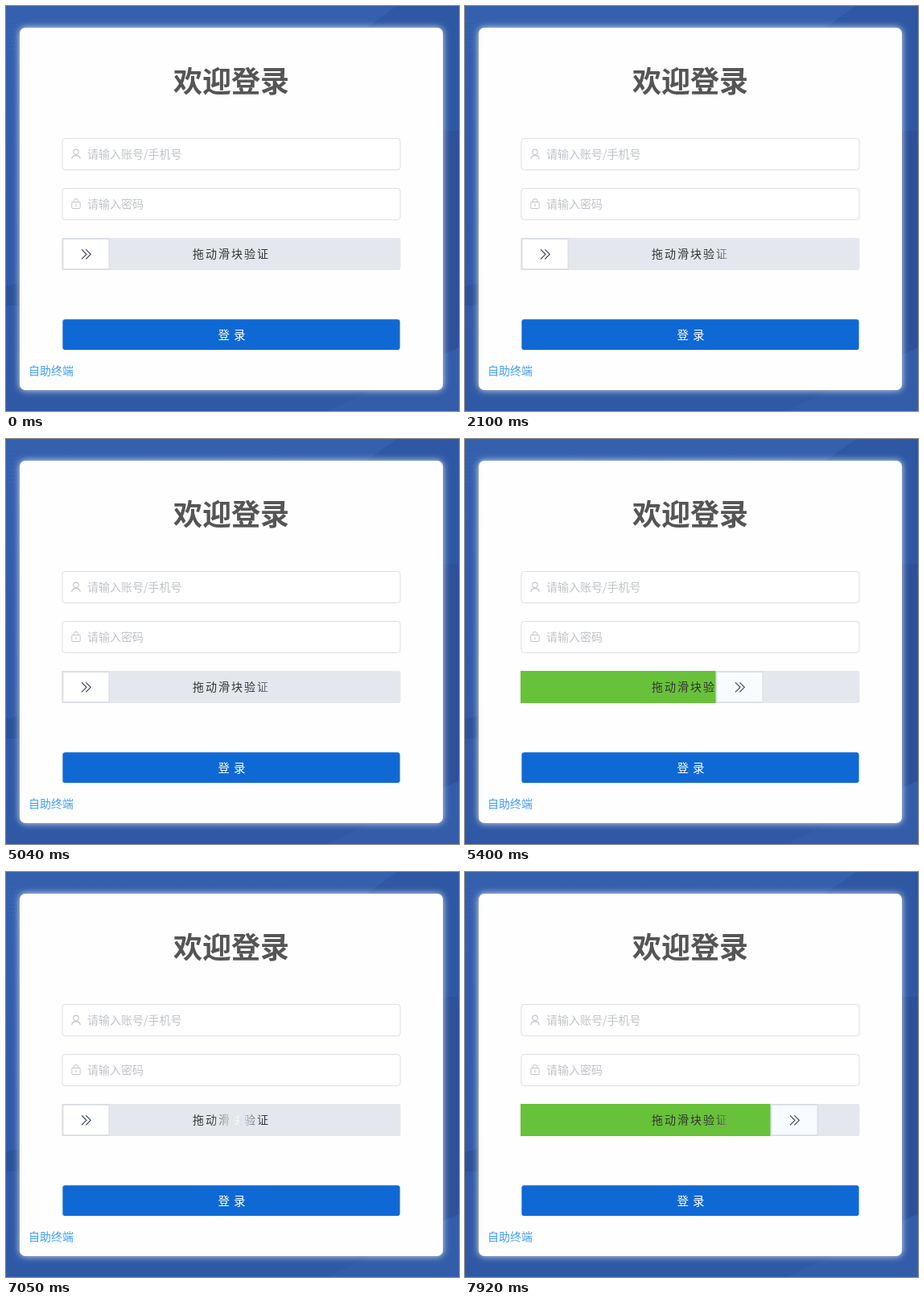
An HTML page with a canvas that plays this animation: 563x503 px, repeating every 8000 ms.

```html
<!DOCTYPE html>
<html lang="zh-CN">
<head>
<meta charset="utf-8">
<style>
html, body { margin: 0; width: 100%; height: 100%; overflow: hidden; background: #315aa7; }
canvas { display: block; width: 563px; height: 503px; }
</style>
</head>
<body>
<canvas id="stage" width="563" height="503"></canvas>
<script>
const ctx = document.getElementById('stage').getContext('2d');
const FONT = '"Noto Sans CJK SC", "Noto Sans CJK", "Noto Sans CJK JP", sans-serif';
const LOOP = 8000, STEP = 30, SHINE = 2880;

// [ms, slider offset in px]
const drags = [
  [[5130, 0], [5220, 45], [5310, 150], [5400, 242], [5520, 285], [5640, 299],
   [5700, 299], [5940, 312], [6089, 312]],
  [[7440, 0], [7530, 45], [7620, 162], [7680, 236], [7770, 280], [7920, 310], [8000, 310]]
];

function offsetAt(t) {
  for (const keys of drags) {
    for (let i = 1; i < keys.length; i++) {
      const [t0, a] = keys[i - 1], [t1, b] = keys[i];
      if (t >= t0 && t <= t1) return Math.round(a + (b - a) * (t - t0) / (t1 - t0));
    }
  }
  return 0;
}

// cubic-bezier(0, 0, .58, 1)
function easeOut(x) {
  let lo = 0, hi = 1;
  for (let i = 0; i < 20; i++) {
    const s = (lo + hi) / 2;
    if (3 * (1 - s) * s * s * 0.58 + s ** 3 < x) lo = s; else hi = s;
  }
  return 3 * (1 - lo) * lo * lo + lo ** 3;
}

function poly(color, ...p) {
  ctx.fillStyle = color;
  ctx.beginPath();
  for (let i = 0; i < p.length; i += 2) ctx.lineTo(p[i], p[i + 1]);
  ctx.fill();
}

function line(color, width, ...p) {
  ctx.strokeStyle = color;
  ctx.lineWidth = width;
  ctx.beginPath();
  for (let i = 0; i < p.length; i += 2) ctx.lineTo(p[i], p[i + 1]);
  ctx.stroke();
}

function box(x, y, w, h, r, fill, stroke) {
  ctx.beginPath();
  ctx.roundRect(x, y, w, h, r);
  if (fill) { ctx.fillStyle = fill; ctx.fill(); }
  if (stroke) { ctx.strokeStyle = stroke; ctx.lineWidth = 1; ctx.stroke(); }
}

function text(str, x, y, size, color, spacing = 0, weight = 400) {
  ctx.font = `${weight} ${size}px ${FONT}`;
  ctx.letterSpacing = spacing + 'px';
  ctx.fillStyle = color;
  ctx.fillText(str, x, y);
}

function backdrop() {
  const g = ctx.createLinearGradient(0, 0, 0, 503);
  g.addColorStop(0, '#3460ae');
  g.addColorStop(0.55, '#315ba8');
  g.addColorStop(1, '#3059a5');
  ctx.fillStyle = g;
  ctx.fillRect(0, 0, 563, 503);
  poly('#2e58a3', 448, 27, 486, 0, 563, 0, 563, 155, 540, 155, 540, 27);
  poly('#2d519a', 540, 155, 563, 155, 563, 425, 540, 435);
  poly('#335ca9', 563, 424, 563, 503, 400, 503);
  poly('#2c529b', 0, 348, 20, 343, 20, 372, 0, 372);
  ctx.fillStyle = '#4770b8';
  for (let y = 18; y < 56; y += 5)
    for (let x = 2; x < 14; x += 4) ctx.fillRect(x + y % 3, y, 1, 1);
}

function userIcon() {
  ctx.strokeStyle = '#c0c4cc';
  ctx.lineWidth = 1.1;
  ctx.beginPath();
  ctx.arc(87, 181.3, 3.2, 0, 7);
  ctx.stroke();
  ctx.beginPath();
  ctx.moveTo(81.8, 190);
  ctx.bezierCurveTo(82, 184.2, 92, 184.2, 92.2, 190);
  ctx.stroke();
}

function lockIcon() {
  box(81.8, 243.5, 10.4, 8, 1, null, '#c0c4cc');
  ctx.beginPath();
  ctx.moveTo(84, 243.5);
  ctx.arc(87, 242.5, 3, Math.PI, 0);
  ctx.lineTo(90, 243.5);
  ctx.stroke();
  line('#c0c4cc', 1.1, 87, 246, 87, 249);
}

function form() {
  ctx.save();
  ctx.shadowColor = 'rgba(255,255,255,.85)';
  ctx.shadowBlur = 8;
  box(17, 27, 526, 450, 7, '#fefefe');
  ctx.restore();

  text('欢迎登录', 208, 106.5, 36, '#555', 0, 700);
  for (const y of [164.5, 226.5]) box(70, y, 420, 39, 3.5, '#fff', '#dcdfe6');
  userIcon();
  lockIcon();
  text('请输入账号/手机号', 101, 189, 14, '#bfc3cb');
  text('请输入密码', 101, 251, 14, '#bfc3cb');
  box(70.5, 389, 419, 38, 3, '#0f69d5', '#cfe0f5');
  box(70.5, 389.5, 419, 37.5, 3, '#0f69d5');
  text('登录', 263.5, 413.5, 14.5, '#fff', 5);
  text('自助终端', 28, 458, 14, '#409eff');
}

function slider(t) {
  const dx = offsetAt(t), x = 70 + dx;
  const hover = (t >= 5100 && t < 6200) || t >= 7380;
  box(69.5, 288, 421, 40, 3, '#e4e7ed');
  if (dx) {
    ctx.fillStyle = '#67c23a';
    ctx.fillRect(69, 288, dx + 1, 40);
  }

  const c = 144 + 217 * easeOut(((t + 80) % SHINE) / SHINE);
  const g = ctx.createLinearGradient(c - 33, 0, c + 33, 0);
  g.addColorStop(0, '#333');
  g.addColorStop(0.5, '#fff');
  g.addColorStop(1, '#333');
  text('拖动滑块验证', 232, 313.2, 14, g, 2);

  ctx.fillStyle = '#dcdfe6';
  ctx.fillRect(x - 0.5, 288, 59.5, 40);
  ctx.fillStyle = hover ? '#f8fcff' : '#fff';
  ctx.fillRect(x + 1.5, 290, 56, 36);
  for (const k of [24, 29.3])
    line('#343b50', 1.1, x + k, 302.3, x + k + 6, 308.3, x + k, 314.3);
}

function draw(now) {
  const t = Math.floor((now % LOOP) / STEP) * STEP;
  backdrop();
  form();
  slider(t);
}

const start = performance.now();
function tick() {
  draw(performance.now() - start);
  requestAnimationFrame(tick);
}
tick();
</script>
</body>
</html>
```
